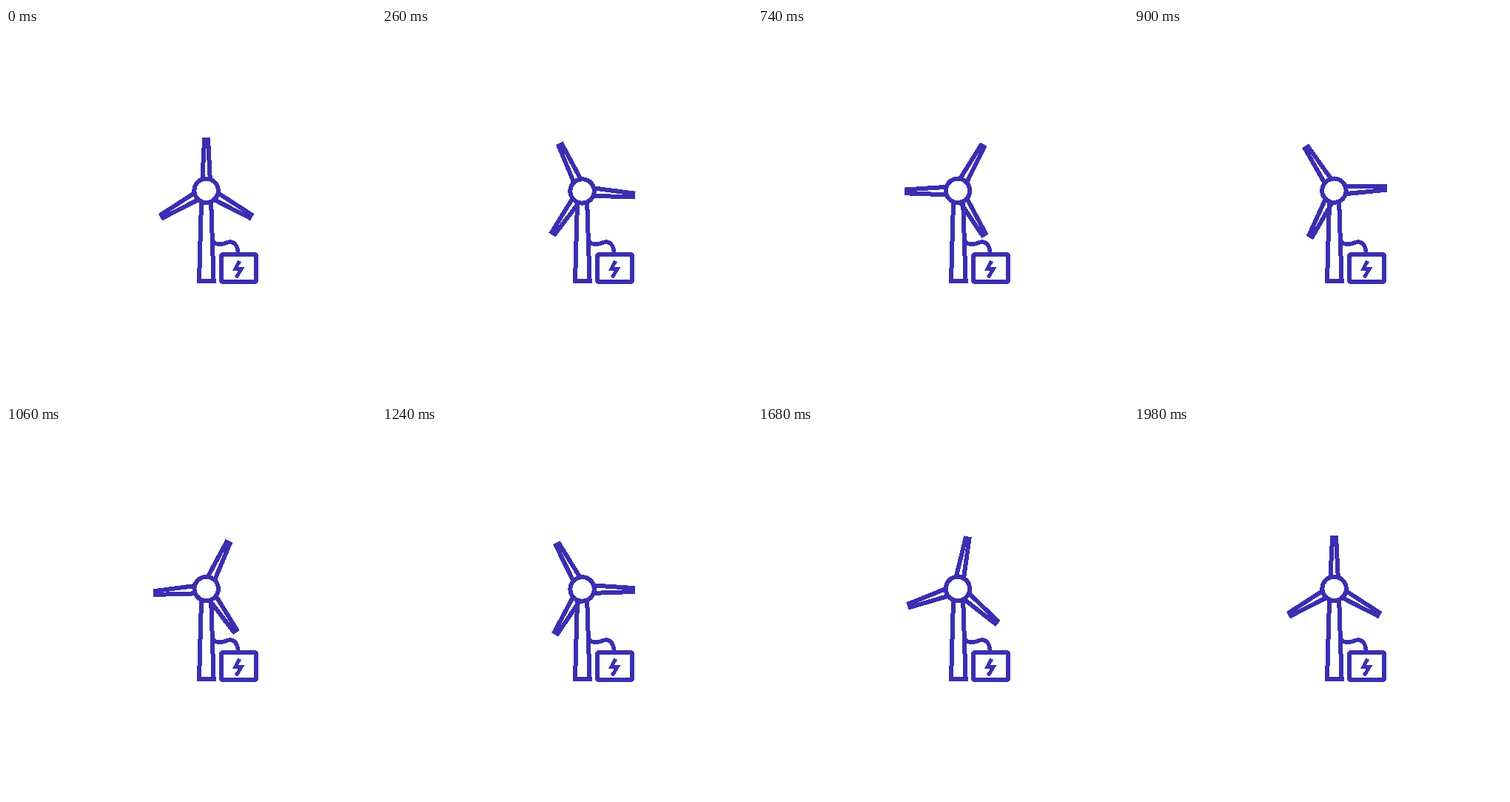
Recreate the animation shown at these times as an HTML page. Size 500x500 px, loop 2 s.

```html
<!DOCTYPE html>
<html lang="en">
<head>
<meta charset="utf-8">
<title>Wind turbine</title>
<style>
  html, body { margin: 0; width: 100%; height: 100%; overflow: hidden; background: #fff; }
  svg { display: block; width: 100vw; height: 100vh; }
</style>
</head>
<body>
<svg viewBox="0 0 500 500" fill="none" stroke="#3a2fb0" stroke-width="6" shape-rendering="crispEdges">
  <defs>
    <path id="blade" d="M265.4 204.5L268.1 151H273.1L275.8 204.5"/>
  </defs>
  <path d="M264 235.5L261 342H280.6L277.2 235.5"/>
  <path d="M279 287C281 293 291 293 297 290.5C307 286 313.5 293 313.5 305" stroke-width="5.5"/>
  <rect x="291.2" y="306" width="46.8" height="37.2" rx="2"/>
  <path d="M315.7 314.8L310.2 325H318.5L311 337.3" stroke-width="5"/>
  <g id="rotor">
    <circle cx="270.6" cy="219.8" r="16.2"/>
    <use href="#blade"/>
    <use href="#blade" transform="rotate(120 270.6 219.8)"/>
    <use href="#blade" transform="rotate(240 270.6 219.8)"/>
  </g>
</svg>
<script>
  const LOOP = 2000, STEP = 20, TURNS = 2;
  const rotor = document.getElementById('rotor');

  // Two steady turns; the last step lands on the starting pose.
  function draw(ms) {
    const step = Math.floor((ms % LOOP) / STEP);
    const angle = 360 * TURNS * step / (LOOP / STEP - 1);
    rotor.setAttribute('transform', `rotate(${angle} 270.3 220.1)`);
  }

  const start = performance.now();
  function tick() {
    draw(performance.now() - start);
    requestAnimationFrame(tick);
  }
  tick();
</script>
</body>
</html>
```
